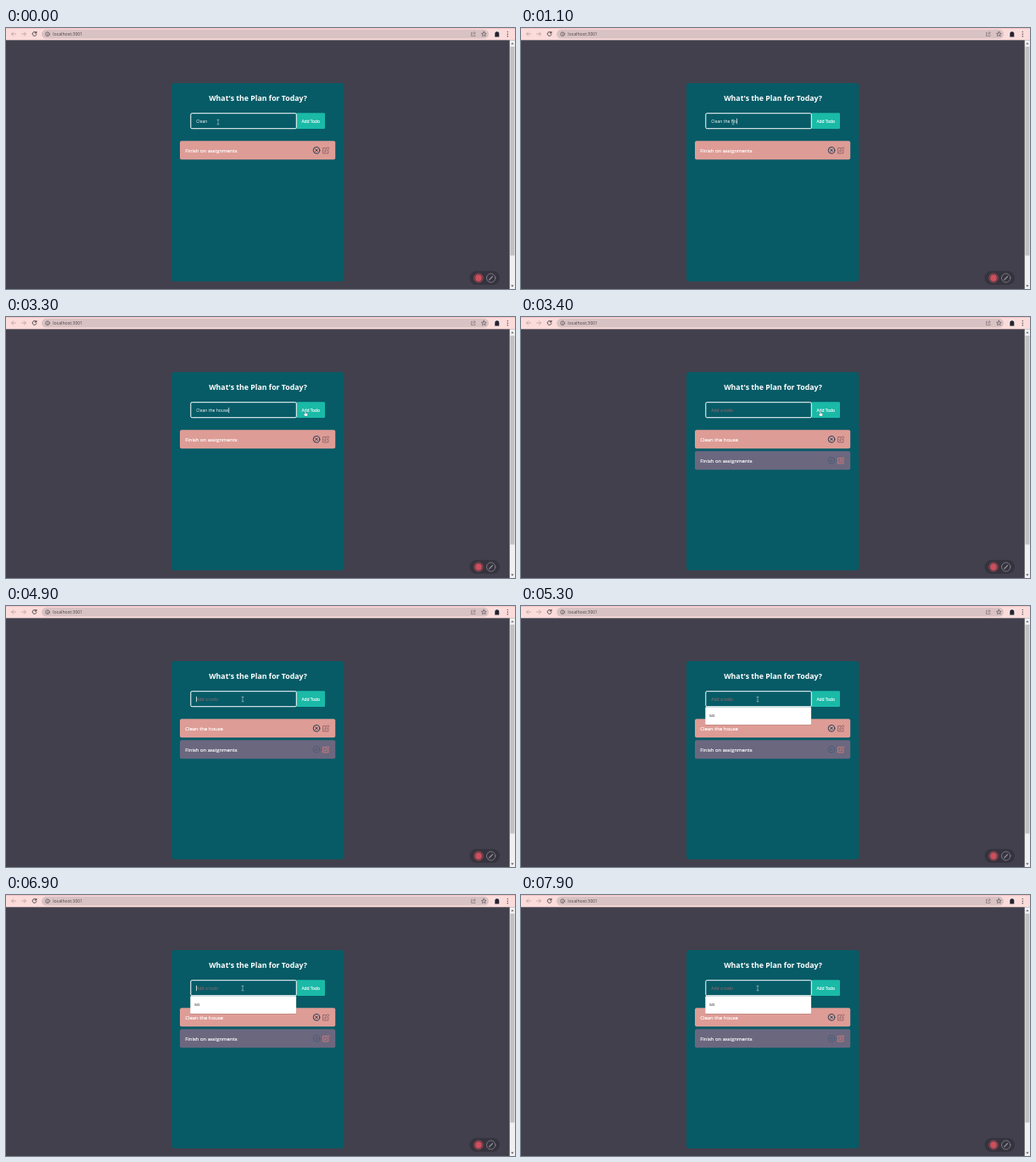
Recreate the animation shown at these times as an HTML page. Size 600 px wide and 308 px high, loop 8000 ms.

```html
<!DOCTYPE html>
<html lang="en">
<head>
<meta charset="utf-8">
<title>Todo list</title>
<style>
  html, body { margin: 0; width: 100%; height: 100%; overflow: hidden; background: #42404d; }
  svg { display: block; width: 100vw; height: 100vh; }
  text { font-family: "Trebuchet MS", "Open Sans", sans-serif; fill: #fff; white-space: pre; }
  .item text { font-size: 5.95px; stroke: #fff; stroke-width: .15; }
  .line { fill: none; stroke-linecap: round; stroke-linejoin: round; }
</style>
</head>
<body>
<svg viewBox="0 0 600 308">
  <defs>
    <g id="remove" class="line" stroke-width="1">
      <circle r="3.8"/>
      <path d="M-1.4-1.4 1.4 1.4M1.4-1.4-1.4 1.4"/>
    </g>
    <g id="edit" class="line" stroke-width=".9">
      <path d="M.3-2.7H-3.4V3.6H2.9V0"/>
      <path d="M-1.2 1.4-.9-.4 2.6-3.8 3.9-2.5.5 1Z"/>
    </g>
  </defs>

  <rect width="600" height="308" fill="#42404d"/>

  <g id="browser">
    <rect width="600" height="14.3" fill="#fbdcda"/>
    <rect width="600" height="1" fill="#f3c5c5"/>
    <rect x="42" y="1.8" width="527" height="10.8" rx="5.4" fill="#d8c2c3"/>
    <g class="line" stroke="#b69d9e" stroke-width=".8">
      <path d="M11.5 7H6.5M8.7 4.8 6.5 7 8.7 9.2"/>
      <path d="M18.5 7H23.5M21.3 4.8 23.5 7 21.3 9.2"/>
    </g>
    <g class="line" stroke="#4b4044" stroke-width=".8">
      <path d="M35.6 5.6A2.4 2.4 0 1 0 35.9 7.7M35.9 4.3V6H34.2" stroke-width="1"/>
      <circle cx="49" cy="7.2" r="2.4" stroke-width=".6"/>
      <path d="M49 7V8.5M49 5.8V5.9" stroke-width=".6"/>
      <path d="M550 5.3H548.5V9.5H553V8.2M550 7.7Q550.3 5.7 553 5.7M551.8 4.4 553.2 5.7 551.8 7" stroke="#776b6e" stroke-width=".6"/>
      <path d="M563.3 4.3 564.1 6.2 566.1 6.4 564.6 7.7 565.1 9.7 563.3 8.6 561.5 9.7 562 7.7 560.5 6.4 562.5 6.2Z" stroke-width=".6"/>
    </g>
    <circle cx="578.8" cy="7.2" r="4.2" fill="#eee5e8"/>
    <path d="M576.3 10.5V7A2.5 2.8 0 0 1 581.3 7V10.5Z" fill="#29222c"/>
    <g fill="#4b4044">
      <circle cx="591.3" cy="4.6" r=".7"/><circle cx="591.3" cy="7.2" r=".7"/><circle cx="591.3" cy="9.8" r=".7"/>
    </g>
    <text x="55.3" y="9" font-size="5.2" style="fill:#493f43">localhost:3001</text>
    <rect x="593.7" y="14.3" width="6.3" height="294" fill="#f1f0f1"/>
    <path d="M595.2 19.2 596.9 17.2 598.6 19.2Z" fill="#666"/>
    <path d="M595.2 303.5 596.9 305.5 598.6 303.5Z" fill="#555"/>
    <rect x="594.4" y="22" width="5" height="246.5" fill="#c2c1c2"/>
  </g>

  <rect x="195" y="65" width="203.3" height="234" rx="3.5" fill="#075b66"/>
  <text x="297" y="85.7" font-size="8.75" font-weight="700" text-anchor="middle">What's the Plan for Today?</text>

  <rect x="342" y="100.3" width="34" height="18.8" rx="1.4" fill="#1abaa7"/>
  <text x="359.2" y="111.8" font-size="4.9" text-anchor="middle" stroke="#fff" stroke-width=".12">Add Todo</text>
  <rect x="217.8" y="100.7" width="124.5" height="18" rx="1.4" fill="#075b66" stroke="#fff"/>
  <text id="field" x="224.2" y="111.8" font-size="5.05"></text>
  <rect id="caret" y="106.8" width=".7" height="6.4" fill="#fff"/>

  <g class="item">
    <rect x="205" y="133.3" width="183.2" height="21.9" rx="2" fill="#de9c96"/>
    <text id="first" x="211.2" y="146.7"></text>
    <use href="#remove" x="366" y="144.3" stroke="#263f54"/>
    <use href="#edit" x="377" y="144.3" stroke="#8f6467"/>
  </g>
  <g class="item" id="second">
    <rect x="205" y="158.3" width="183.2" height="21.9" rx="2" fill="#6b677f"/>
    <text x="211.2" y="171.7">Finish on assignments</text>
    <use href="#remove" x="366" y="169.3" stroke="#4d5c77"/>
    <use href="#edit" x="377" y="169.3" stroke="#d17f79"/>
  </g>

  <g id="suggestions">
    <rect x="217.5" y="120" width="124.8" height="20.8" rx="1" fill="#000" opacity=".15"/>
    <rect x="217.3" y="119.3" width="124.8" height="20.7" rx="1" fill="#fff"/>
    <text x="222" y="131.2" font-size="6" style="fill:#29272b">so</text>
  </g>

  <g id="recorder">
    <rect x="546.5" y="286.7" width="35.5" height="16.3" rx="8" fill="#35333e"/>
    <circle cx="557" cy="295" r="5.2" fill="none" stroke="#b9515c" stroke-width=".8"/>
    <circle cx="557" cy="295" r="3.9" fill="#cc4f5c"/>
    <g class="line" stroke="#8d8a93" stroke-width=".8">
      <circle cx="571.7" cy="295" r="5.2"/>
      <path d="M569.8 297 573.5 293.2" stroke-width="1.4"/>
    </g>
  </g>

  <path id="beam" class="line" d="M-1-2.7H1M0-2.7V2.7M-1 2.7H1" stroke="#b9cccf" stroke-width=".6"/>
  <path id="hand" d="M-.8-3Q-.1-3.7.4-2.9V-.6L2.3-.2Q2.8 0 2.7 1L2.2 3.1H-.6L-2.4.8Q-2.2-.1-.8.7Z" fill="#fff" stroke="#334b50" stroke-width=".35"/>
</svg>
<script>
const LOOP = 8000;
const START = "Clean", FULL = "Clean the house";
const KEY_TIMES = [200, 300, 500, 600, 700, 900, 1000, 1200, 1500, 1900];
const SUBMIT = 3400, FOCUS = 4700, SUGGEST = 5200, BLINK = 530;
const MOUSE = [[2400, 250, 111], [2700, 291, 116], [3150, 353, 114], [4150, 353, 114], [4600, 279, 110]];

const el = id => document.getElementById(id);
const show = (id, on) => el(id).setAttribute("visibility", on ? "visible" : "hidden");
const ease = p => p * p * (3 - 2 * p);

function mouseAt(t) {
  const next = MOUSE.findIndex(k => k[0] > t);
  if (next === 0) return MOUSE[0].slice(1);
  if (next < 0) return MOUSE[MOUSE.length - 1].slice(1);
  const [t0, x0, y0] = MOUSE[next - 1], [t1, x1, y1] = MOUSE[next];
  const p = ease((t - t0) / (t1 - t0));
  return [x0 + (x1 - x0) * p, y0 + (y1 - y0) * p];
}

function caretOn(t, typed) {
  if (t < SUBMIT) return typed > 0 && (t - KEY_TIMES[typed - 1]) % (2 * BLINK) < BLINK;
  return t >= FOCUS && t < 7700 && (t - FOCUS) % 1000 < 500;
}

function render(t) {
  const added = t >= SUBMIT;
  const typed = KEY_TIMES.filter(k => k <= t).length;
  const field = el("field");
  field.textContent = added ? "Add a todo" : FULL.slice(0, START.length + typed);
  field.style.fill = added ? "#a5666c" : "#fff";
  el("caret").setAttribute("x", added ? 224 : 224.4 + field.getComputedTextLength());
  show("caret", caretOn(t, typed));

  el("first").textContent = added ? FULL : "Finish on assignments";
  show("second", added);
  show("suggestions", t >= SUGGEST);

  const [x, y] = mouseAt(t), overButton = x > 342.5;
  for (const id of ["beam", "hand"]) el(id).setAttribute("transform", `translate(${x} ${y})`);
  show("beam", !overButton);
  show("hand", overButton);
}

const begin = performance.now();
function tick() {
  render((performance.now() - begin) % LOOP);
  requestAnimationFrame(tick);
}
tick();
</script>
</body>
</html>
```
